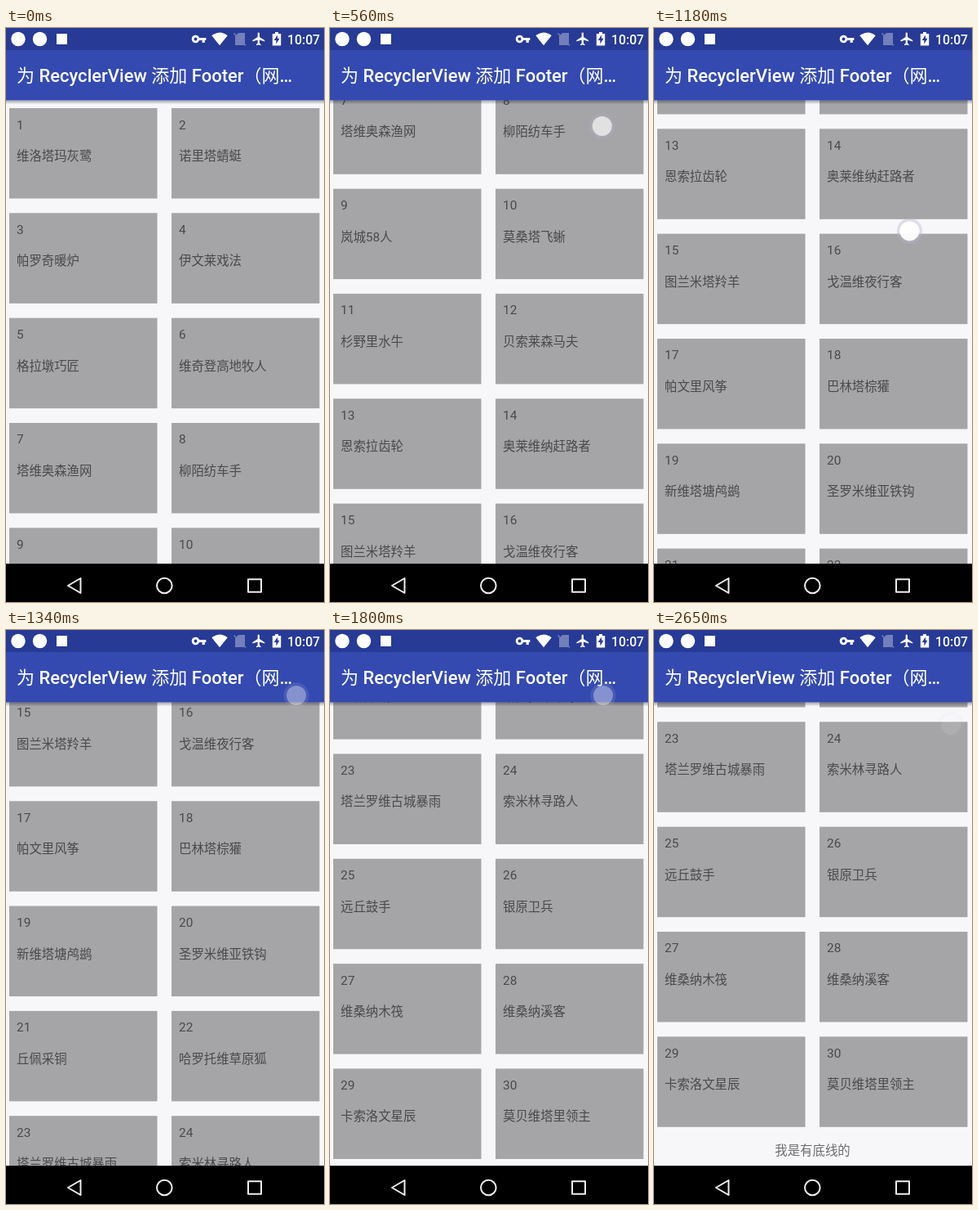
Animation of 390 by 702 pixels, one loop 2720 ms. Source, as an HTML page:

```html
<!DOCTYPE html>
<html lang="zh-CN">
<head>
<meta charset="utf-8">
<title>RecyclerView Footer</title>
<style>
  html, body { margin: 0; width: 100%; height: 100%; overflow: hidden; background: #f7f6f9; }
  svg { display: block; width: 390px; height: 702px; }
  text { font: 15.4px Roboto, "Noto Sans CJK SC", "Noto Sans CJK", sans-serif; fill: #4a494b; white-space: pre; }
  .title { font-size: 22px; font-weight: 500; fill: #fff; }
  .clock { font-size: 15.8px; font-weight: 500; fill: #fff; }
  .footer { fill: #6c6b6e; text-anchor: middle; }
  .card { fill: #a5a4a6; }
</style>
</head>
<body>
<svg viewBox="0 0 390 702">
  <defs>
    <linearGradient id="shade" x2="0" y2="1">
      <stop stop-color="#000" stop-opacity=".32"/>
      <stop offset="1" stop-color="#000" stop-opacity="0"/>
    </linearGradient>
  </defs>
  <rect width="390" height="702" fill="#f7f6f9"/>
  <g id="list"></g>

  <rect y="88.5" width="390" height="5" fill="url(#shade)"/>
  <rect width="390" height="88.5" fill="#344ab0"/>
  <rect width="390" height="27" fill="#273a96"/>
  <text class="title" x="13" y="66">为 RecyclerView 添加 Footer（网…</text>

  <g fill="#fff">
    <circle cx="15" cy="13.5" r="8.7"/>
    <circle cx="41.5" cy="13.5" r="8.7"/>
    <rect x="62" y="7" width="13" height="13"/>
    <circle cx="232.5" cy="13.5" r="3.4" fill="none" stroke="#fff" stroke-width="2.8"/>
    <path d="M236 12h9.3v3h-1.5v3h-3.2v-3h-4.6z"/>
    <path d="M252.3 9.3Q262 1.8 271.7 9.3L262 21.2z"/>
    <g opacity=".35">
      <path d="M285 6h8v15h-12V10z"/>
      <path d="M279.5 6.5L294 21.5" stroke="#fff" stroke-width="1.6"/>
    </g>
    <path transform="translate(300.8 4) scale(.78)" d="M21 16v-2l-8-5V3.5a1.5 1.5 0 0 0-3 0V9l-8 5v2l8-2.5V19l-2 1.5V22l3.5-1 3.5 1v-1.5L13 19v-5.5z"/>
    <path d="M330 5h4v2h3.2v14.5h-10.4V7h3.2z"/>
    <path d="M333 8.5l-4.3 6.5h2.6v4.5l4.2-6.8h-2.5z" fill="#273a96"/>
  </g>
  <text class="clock" x="345" y="19.5">10:07</text>

  <rect y="655.2" width="390" height="46.8" fill="#000"/>
  <g fill="none" stroke="#eee" stroke-width="2" stroke-linejoin="round">
    <path d="M76 682L91.5 673V691z"/>
    <circle cx="194.3" cy="682" r="9.3"/>
    <rect x="297" y="674.3" width="16" height="15.5"/>
  </g>

  <g id="touch">
    <circle r="13.8" fill="none" stroke="#b4b4cf" stroke-opacity=".4" stroke-width="3.6"/>
    <circle r="12" fill="#fff"/>
  </g>
</svg>
<script>
const LOOP = 2720, PITCH = 128.33, TOP = 98, END = 1397.3;

const teams = `维洛塔玛灰鹭 诺里塔蜻蜓 帕罗奇暖炉 伊文莱戏法 格拉墩巧匠 维奇登高地牧人
塔维奥森渔网 柳陌纺车手 岚城58人 莫桑塔飞蜥 杉野里水牛 贝索莱森马夫
恩索拉齿轮 奥莱维纳赶路者 图兰米塔羚羊 戈温维夜行客 帕文里风筝 巴林塔棕獾
新维塔塘鸬鹚 圣罗米维亚铁钩 丘佩采铜 哈罗托维草原狐 塔兰罗维古城暴雨 索米林寻路人
远丘鼓手 银原卫兵 维桑纳木筏 维桑纳溪客 卡索洛文星辰 莫贝维塔里领主`.split(/\s+/);

// Moments at which the screen refreshes
const ticks = [0, 230, 310, 390, 470, 560, 640, 710, 780, 870, 950, 1030, 1110, 1180, 1260,
  1340, 1410, 1490, 1570, 1640, 1720, 1800, 1870, 1950, 2040, 2260, 2340, 2420, 2490, 2570, 2650];

// start, duration, distance
const scrolls = [
  [230, 398.5, 450],
  [950, 390, 465.4],
  [1494, 358, 469.6],
];

const swipes = [
  { at: 230, dur: 400, from: [240, 539], to: [342, 83], peak: .72, last: .4 },
  { at: 950, dur: 390, from: [240, 539], to: [356, 80], peak: .95, last: .4 },
  { at: 1490, dur: 309, from: [250, 436], to: [335, 80], peak: .7, last: .4 },
  { at: 2260, dur: 390, from: [283, 430], to: [364, 116], peak: .68, last: .1 },
];

const list = document.getElementById('list');
const touch = document.getElementById('touch');

function add(tag, attrs, content = '') {
  const el = document.createElementNS('http://www.w3.org/2000/svg', tag);
  for (const key in attrs) el.setAttribute(key, attrs[key]);
  el.textContent = content;
  list.append(el);
}

teams.forEach((name, i) => {
  const x = i % 2 ? 203 : 4;
  const y = TOP + (i >> 1) * PITCH;
  add('rect', { class: 'card', x, y, width: 181.5, height: 110.5 });
  add('text', { x: x + 9, y: y + 25.5 }, i + 1);
  add('text', { x: x + 9, y: y + 64 }, name);
});
add('text', { class: 'footer', x: 194.5, y: END + 642.3 }, '我是有底线的');

const clamp = v => Math.min(1, Math.max(0, v));
const mix = (a, b, p) => a + (b - a) * p;
const smooth = p => p * p * (3 - 2 * p);

function scrollAt(t) {
  const dragged = scrolls.reduce((sum, [at, dur, dist]) => sum + dist * smooth(clamp((t - at) / dur)), 0);
  const rest = clamp((t - 1851) / 189);
  return dragged + (END - 1385) * (1 - (1 - rest) ** 2);
}

function drawTouch(t) {
  const s = swipes.find(s => t >= s.at && t <= s.at + s.dur + 15);
  touch.setAttribute('opacity', 0);
  if (!s) return;
  const p = clamp((t - s.at) / s.dur);
  const [x, y] = s.from.map((v, i) => mix(v, s.to[i], smooth(p)));
  touch.setAttribute('transform', `translate(${x} ${y})`);
  touch.setAttribute('opacity', mix(s.peak, s.last, clamp((p - .8) / .2)));
}

const start = performance.now();

function draw() {
  const now = (performance.now() - start) % LOOP;
  const t = ticks.filter(v => v <= now).pop();
  list.setAttribute('transform', `translate(0 ${-scrollAt(t)})`);
  drawTouch(t);
  requestAnimationFrame(draw);
}
draw();
</script>
</body>
</html>
```
